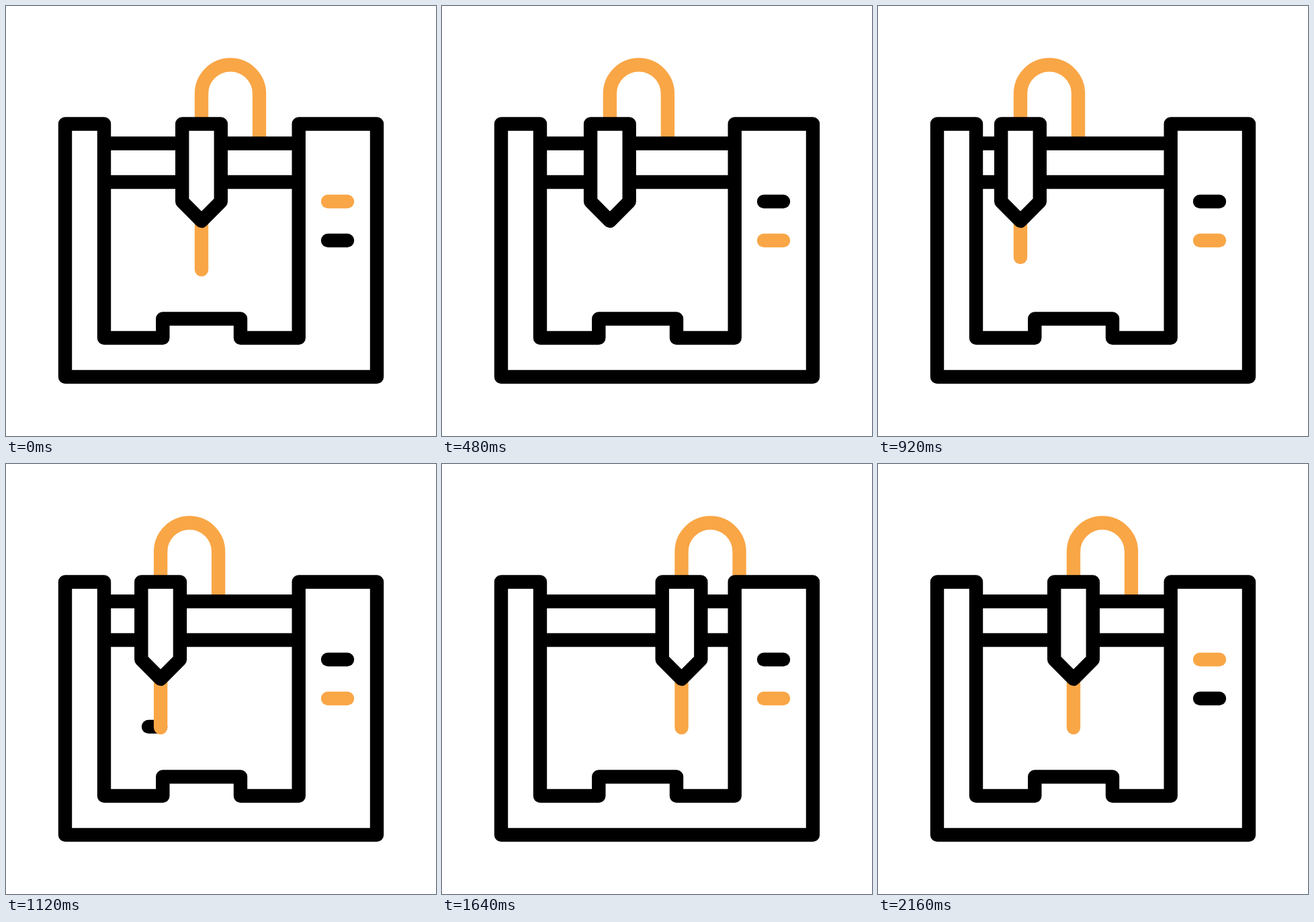
These frames come from a looping animation (640 px wide and 640 px high, 2320 ms). An HTML page:

```html
<!DOCTYPE html>
<html lang="en">
<head>
<meta charset="utf-8">
<title>3D printer</title>
<style>
  html, body { margin: 0; width: 100%; height: 100%; overflow: hidden; background: #fff; }
  svg { display: block; width: 100vw; height: 100vh; }
  .line { fill: none; stroke: #000; stroke-width: 20.4; stroke-linecap: round; stroke-linejoin: round; }
  .solid { fill: #fff; }
  .accent { stroke: #f9a646; }
</style>
</head>
<body>
<svg viewBox="0 0 640 640">
  <path id="hose" class="line accent" d="M0 204V130.5a43 43 0 0 1 86 0V200"/>
  <path class="line" d="M146 204.5H436M146 262H436"/>
  <path class="line solid" d="M88 175.5H146V494H233.3V465.5H349V494H435.7V175.5H552V552H88Z"/>
  <path id="top" class="line" d="M479 291H508"/>
  <path id="bottom" class="line" d="M479 349H508"/>
  <path id="layer" class="line"/>
  <path id="filament" class="line accent"/>
  <path id="nozzle" class="line solid" d="M-28.8 175.5H28.8V291L0 320L-28.8 291Z"/>
</svg>
<script>
  const LOOP = 2320, STEP = 40, LAST = 2160;
  const LEFT = 212, MID = 291, RIGHT = 370;
  const [hose, topLight, bottomLight, layer, filament, nozzle] =
    ['hose', 'top', 'bottom', 'layer', 'filament', 'nozzle'].map(id => document.getElementById(id));

  // Smooth progress from 0 to 1 between two times
  const ease = (t, from, to) => {
    const p = Math.min(1, Math.max(0, (t - from) / (to - from)));
    return p * p * (3 - 2 * p);
  };

  function draw(t) {
    const x = MID
      + (LEFT - MID) * ease(t, 252, 696)
      + (RIGHT - LEFT) * ease(t, 1027, 1468)
      + (MID - RIGHT) * ease(t, 1455, 2160);
    const move = `translate(${x} 0)`;
    hose.setAttribute('transform', move);
    nozzle.setAttribute('transform', move);

    const out = 1 - ease(t, 0, 260) + ease(t, 696, 1027);
    filament.setAttribute('d', `M${x} 300V${318 + 74.3 * out}`);

    // The printed line follows the nozzle, then its tail catches up
    const head = LEFT + (RIGHT - LEFT) * ease(t, 1027, 1468);
    const tail = LEFT + (RIGHT - LEFT) * ease(t, 1156, 1597);
    layer.setAttribute('d', `M${tail} 391H${head}`);
    layer.style.display = head - tail > 0.1 ? '' : 'none';

    const printing = t >= 480 && t < 1800;
    topLight.classList.toggle('accent', !printing);
    bottomLight.classList.toggle('accent', printing);
  }

  const start = performance.now();
  function tick() {
    const t = (performance.now() - start + 1) % LOOP;
    draw(Math.min(LAST, Math.floor(t / STEP) * STEP));
    requestAnimationFrame(tick);
  }
  tick();
</script>
</body>
</html>
```
